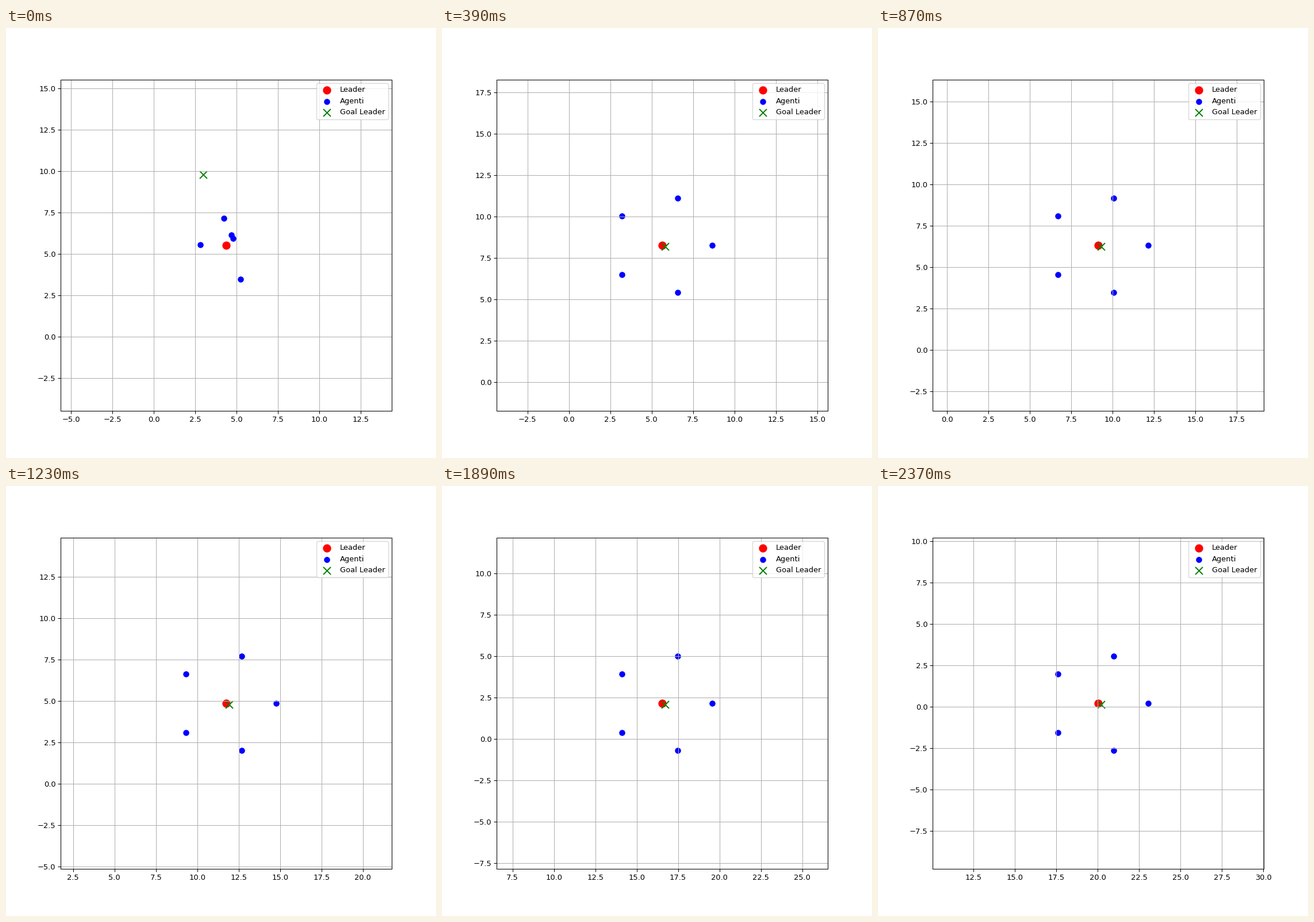
These frames come from a looping animation (748 px wide and 748 px high, 2400 ms). A matplotlib script:

```python
import numpy as np
import matplotlib.pyplot as plt
from matplotlib.animation import FuncAnimation

FRAMES = 80
INTERVAL = 30
GAIN = 0.6          # share of the remaining error closed per frame
RADIUS = 3.0        # formation radius around the leader
HALF_VIEW = 10.0

GOAL_START = np.array([2.96, 9.795])
GOAL_STEP = np.array([0.2181, -0.1222])
LEADER_START = np.array([4.377, 5.53])

# Agents' starting places relative to the leader
AGENTS_START = np.array([
    [0.40, 0.41], [0.30, 0.63], [-0.15, 1.64], [-1.58, 0.02], [0.86, -2.06],
])
angles = 2 * np.pi * np.arange(5) / 5
FORMATION = RADIUS * np.column_stack([np.cos(angles), np.sin(angles)])


def simulate():
    """Return goal, leader and agent positions for every frame."""
    leader, offsets = LEADER_START, AGENTS_START
    states = []
    for n in range(FRAMES):
        goal = GOAL_START + n * GOAL_STEP
        if n:
            leader = leader + GAIN * (goal - leader)
            offsets = offsets + GAIN * (FORMATION - offsets)
        states.append((goal, leader, leader + offsets))
    return states


states = simulate()

fig, ax = plt.subplots(figsize=(8, 8), dpi=93.5)
ax.set_aspect("equal")
ax.grid(True)
leader_dot = ax.scatter([0], [0], c="red", s=100, label="Leader")
agent_dots = ax.scatter([0], [0], c="blue", s=50, label="Agenti")
goal_mark = ax.scatter([0], [0], c="green", s=100, marker="x",
                       label="Goal Leader")
ax.legend(loc="upper right")


def update(n):
    goal, leader, agents = states[n]
    leader_dot.set_offsets([leader])
    agent_dots.set_offsets(agents)
    goal_mark.set_offsets([goal])
    # The view follows the leader
    ax.set_xlim(leader[0] - HALF_VIEW, leader[0] + HALF_VIEW)
    ax.set_ylim(leader[1] - HALF_VIEW, leader[1] + HALF_VIEW)
    return leader_dot, agent_dots, goal_mark


anim = FuncAnimation(fig, update, frames=FRAMES, interval=INTERVAL,
                     repeat=True, repeat_delay=0, blit=False)
plt.show()
```
